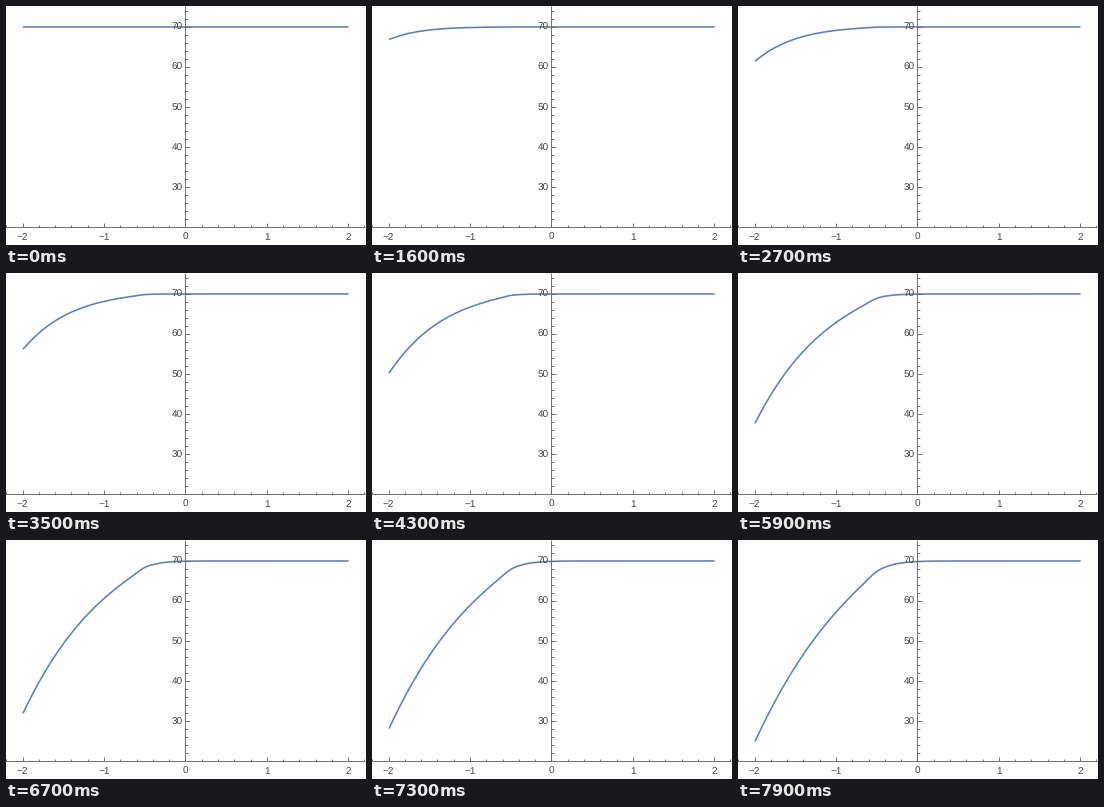
Animation of 360 by 239 pixels, one loop 8000 ms. Source, as a matplotlib script:

```python
import numpy as np
import matplotlib.pyplot as plt
from matplotlib.animation import FuncAnimation

W, H, DPI = 360, 239, 72          # one point equals one pixel
FRAMES, STEP = 80, 100
GRAY, INK, BLUE = "#666666", "#444444", "#5e81b5"
X0, AXIS_Y = 179, 221.5


def px(x):
    return 179.8 + 81.4 * x


def py(u):
    return 20.95 + 4.015 * (70 - u)


# Heat flow through a rod: fast diffusion left of -0.5, slow diffusion right.
grid = np.linspace(-2, 2, 25)
h = grid[1] - grid[0]
k = np.where(grid < -0.5 - 1e-6, 0.2, 0.015)
OMEGA = 2 * np.pi / 19.9
SUB = 20


def solve():
    u = np.full(grid.size, 70.0)
    states = [u.copy()]
    dt = STEP / 1000 / SUB
    for i in range(1, (FRAMES - 1) * SUB + 1):
        u[1:-1] += dt * k[1:-1] * (u[2:] - 2 * u[1:-1] + u[:-2]) / h**2
        u[0] = 45 + 25 * np.cos(OMEGA * i * dt)
        if i % SUB == 0:
            states.append(u.copy())
    return states


def smooth(u, x):
    """Cubic Hermite interpolation of the grid values."""
    m = np.gradient(u, edge_order=2)
    i = np.clip(((x + 2) / h).astype(int), 0, grid.size - 2)
    s = (x - grid[i]) / h
    return (u[i] * (1 + 2 * s) * (1 - s) ** 2 + m[i] * s * (1 - s) ** 2
            + u[i + 1] * s**2 * (3 - 2 * s) + m[i + 1] * s**2 * (s - 1))


states = solve()
xs = np.linspace(-2, 2, 321)

plt.rcParams["font.family"] = "Liberation Sans"
plt.rcParams["text.hinting"] = "none"
fig = plt.figure(figsize=(W / DPI, (H + 1e-6) / DPI), dpi=DPI, facecolor="white")
ax = fig.add_axes([0, 0, 1, 1])
ax.set(xlim=(0, W), ylim=(H, 0))
ax.axis("off")

curve, = ax.plot([], [], color=BLUE, lw=1.6, solid_capstyle="butt",
                 snap=False, zorder=1)


def line(x1, y1, x2, y2):
    ax.plot([x1, x2], [y1, y2], color=GRAY, lw=0.9, solid_capstyle="butt", zorder=2)


def label(x, y, text, align):
    ax.text(x, y, text, size=10, color=INK, ha=align, va="baseline", zorder=3)


line(0, AXIS_Y, 359, AXIS_Y)
line(X0, 0, X0, AXIS_Y)

for i in range(-11, 12):
    x = px(i / 5) - 0.4
    major = i % 5 == 0
    line(x, AXIS_Y, x, AXIS_Y - (4.5 if major else 2.5))
    if major:
        label(x, 234, str(i // 5).replace("-", "\u2212"), "center")

for v in range(22, 76, 2):
    y = py(v) - 0.25
    major = v % 10 == 0
    line(X0, y, X0 + (4.5 if major else 2.5), y)
    if major:
        label(177, y + 3.5, str(v), "right")


def update(n):
    curve.set_data(px(xs), py(smooth(states[n], xs)))
    return curve,


anim = FuncAnimation(fig, update, frames=FRAMES, interval=STEP,
                     repeat=True, repeat_delay=0, blit=False)
plt.show()
```
